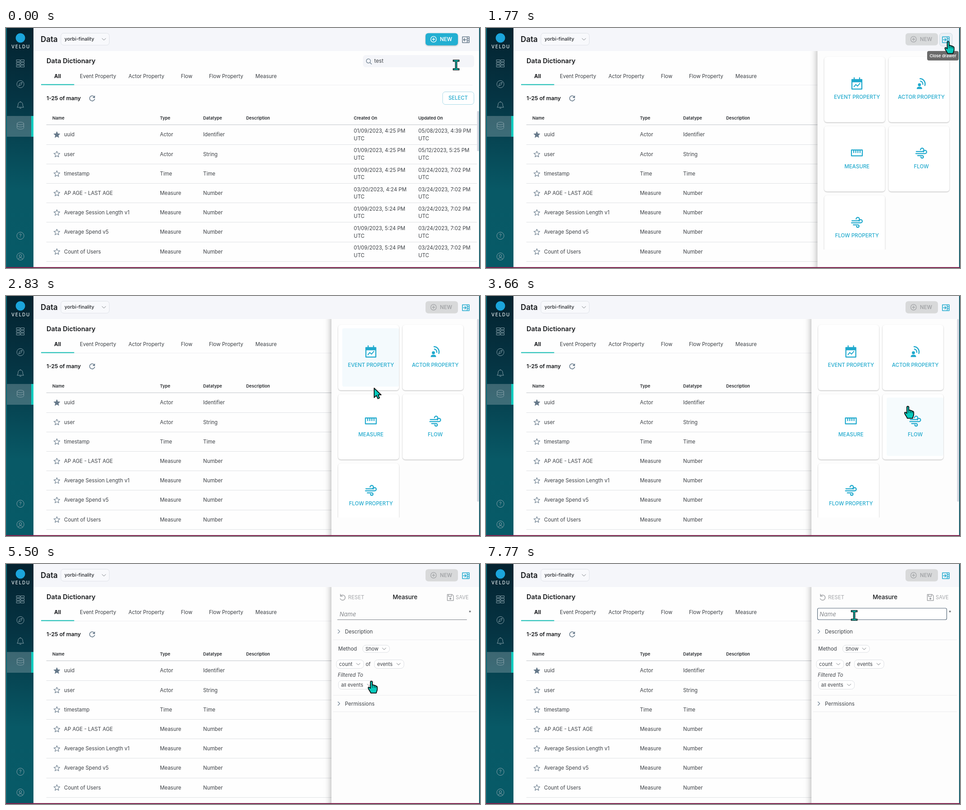
Write an HTML page that moves like this. It is 1053 px wide and 532 px high and loops after 8000 ms.

```html
<!DOCTYPE html>
<html lang="en">
<head>
<meta charset="utf-8">
<title>Data Dictionary</title>
<style>
html, body { margin: 0; width: 100%; height: 100%; overflow: hidden; background: #fff; }
svg { display: block; width: 1053px; height: 532px; font-family: Inter, "Open Sans", sans-serif; }
text { white-space: pre; }
.line { fill: none; stroke-linecap: round; stroke-linejoin: round; }
.card { fill: #fff; filter: drop-shadow(0 1px 1px rgba(0,0,0,.28)); }
.sheet { fill: #fdfdfd; filter: drop-shadow(0 0 8px rgba(0,0,0,.36)); }
.raised { filter: drop-shadow(0 1px 1.5px rgba(0,0,0,.3)); }
</style>
</head>
<body>
<svg id="stage" viewBox="0 0 1053 532" xmlns="http://www.w3.org/2000/svg"></svg>
<script>
const LOOP = 8000;
const BLUE = '#1fa9cd', INK = '#3d4146', DARK = '#17191c', SLATE = '#66798a', MUTED = '#a3a5a8';

// y is the vertical middle of the capitals
const text = (x, y, str, size = 11.48, fill = INK, weight = 400, more = '') =>
  `<text x="${x}" y="${(y + size * 0.36).toFixed(2)}" font-size="${size}" fill="${fill}" font-weight="${weight}" ${more}>${str}</text>`;
const rect = (x, y, w, h, fill, r = 0, more = '') =>
  `<rect x="${x}" y="${y}" width="${w}" height="${h}" rx="${r}" fill="${fill}" ${more}/>`;
const path = (d, stroke, width = 1, more = '') =>
  `<path class="line" d="${d}" stroke="${stroke}" stroke-width="${width}" ${more}/>`;
const at = (x, y, body, more = '') => `<g transform="translate(${x} ${y})" ${more}>${body}</g>`;
const rule = (x1, x2, y, color) => path(`M${x1} ${y}H${x2}`, color);
const chevron = (x, y, color = '#74787d') => path(`M${x - 4} ${y - 2}l4 4l4-4`, color);
const middle = 'text-anchor="middle"';

function star(x, y, fill) {
  let d = '';
  for (let i = 0; i < 10; i++) {
    const r = i % 2 ? 3.2 : 7, a = Math.PI * (i / 5 - 0.5);
    d += `${i ? 'L' : 'M'}${(x + r * Math.cos(a)).toFixed(1)} ${(y + 0.6 + r * Math.sin(a)).toFixed(1)}`;
  }
  return `<path d="${d}Z" fill="${fill}" stroke="${SLATE}" stroke-width="1.1" stroke-linejoin="round"/>`;
}

function sidebar() {
  const c = '#86a0a9';
  const ring = `<circle r="8" fill="none" stroke="${c}"/>`;
  return rect(0, 0, 61, 532, 'url(#deep)') + rect(0, 0, 2, 532, '#0c6674')
    + `<circle cx="32" cy="22" r="10.5" fill="#1ba5dc"/>`
    + text(12, 41.3, 'VELDU', 9.8, '#eef5f7', 500, 'letter-spacing="1.9"')
    + rect(2, 195, 59, 46, 'rgba(255,255,255,.22)') + rect(56, 195, 5, 46, '#0ccbbf')
    + at(32, 78.5, path('M-8.5-8h7.5v4h-7.5zM1-8h7.5v4H1zM-8.5-2h7.5v4h-7.5zM1-2h7.5v4H1zM-8.5 4h7.5v4h-7.5zM1 4h7.5v4H1z', c))
    + at(32, 124.5, ring + path('M4-4L1.5 1.5L-4 4L-1.5-1.5Z', c))
    + at(32, 170.5, path('M-7 5Q-5 3-5-1.5A5 5 0 0 1 5-1.5Q5 3 7 5ZM-1.5 7.5h3M0-7.5v1', c))
    + at(32, 216.5, path('M-7.5-5a7.5 2.8 0 1 1 15 0a7.5 2.8 0 1 1-15 0V5a7.5 2.8 0 0 0 15 0V-5M-7.5 0a7.5 2.8 0 0 0 15 0', c))
    + at(32, 460.5, ring + text(0, 0, '?', 10.5, c, 400, middle))
    + at(32, 506.5, ring + path('M-5 6Q-4 2.5 0 2.5T5 6M-2.8-1.5a2.8 2.8 0 1 1 5.6 0a2.8 2.8 0 1 1-5.6 0', c));
}

const newButton = (fill, ink, cls) => rect(932, 11.5, 72, 27, fill, 6, `class="${cls}"`)
  + path('M943.5 25a6.3 6.3 0 1 1 12.6 0a6.3 6.3 0 1 1-12.6 0M946.8 25h6M949.8 22v6', ink, 1.3)
  + text(964, 24.8, 'NEW', 11.4, ink, 600);

const drawerIcon = (color, arrow) => at(1021.5, 26,
  path('M-7.5-6.5h15v13h-15zM3-6.5v13M3-2.2h4.5M3 2.2h4.5', color, 1.5) + path(arrow, color, 1.6));

function header() {
  return rect(61, 0, 992, 51, '#f5f6fa')
    + text(77, 24.5, 'Data', 16.9, DARK, 600)
    + rect(122, 11.5, 107.5, 26.5, '#f8f9fc', 6, 'stroke="#dfe2e8"')
    + text(130, 24.3, 'yorbi-finality', 10.75, '#24272b', 500) + chevron(217.5, 25)
    + `<g id="newOn">${newButton('#22afd2', '#fff', 'raised')}</g>`
    + `<g id="newOff">${newButton('#d8d9da', MUTED, '')}</g>`
    + rect(1007.5, 11.5, 28.5, 28.5, '#e9f0f5', 6, 'id="iconHover" stroke="#cfdae1"')
    + `<g id="iconShut">${drawerIcon(SLATE, 'M1 0h-6M-2.5-2.8L-5 0l2.5 2.8')}</g>`
    + `<g id="iconOpen">${drawerIcon(BLUE, 'M-5.5 0h6M-2-2.8L.5 0L-2 2.8')}</g>`;
}

const U = '03/24/2023, 7:02 PM', C = '01/09/2023, 5:24 PM', E = '01/09/2023, 4:25 PM';
const rows = [
  ['uuid', 'Actor', 'Identifier', E, '05/08/2023, 4:39 PM'],
  ['user', 'Actor', 'String', E, '05/12/2023, 5:25 PM'],
  ['timestamp', 'Time', 'Time', E, U],
  ['AP AGE - LAST AGE', 'Measure', 'Number', '03/20/2023, 4:24 PM', U],
  ['Average Session Length v1', 'Measure', 'Number', C, U],
  ['Average Spend v5', 'Measure', 'Number', C, U],
  ['Count of Users', 'Measure', 'Number', C, U]
];

function page() {
  let s = text(90, 73, 'Data Dictionary', 14.6, DARK, 600)
    + rect(793, 60, 247, 27, '#f4f5f9', 6)
    + path('M800.5 73a4.6 4.6 0 1 1 9.2 0a4.6 4.6 0 1 1-9.2 0M808.5 76.5l3.5 3.5', SLATE, 1.2)
    + text(818, 73, 'test', 11.7)
    + rule(90, 1036, 126.5, '#ededf1') + rect(78, 124.5, 73.5, 2, '#14bdb3')
    + text(107, 106.5, 'All', 11.7, DARK, 700);
  [[164, 'Event Property'], [272, 'Actor Property'], [388.5, 'Flow'], [451, 'Flow Property'], [554, 'Measure']]
    .forEach(([x, label]) => s += text(x, 106.5, label, 11.5));
  s += text(90, 156, '1-25 of many', 12.2, DARK, 600)
    + path('M196 152.5a5.7 5.7 0 1 0 .9 5', SLATE, 1.6) + `<path d="M197.6 149.5v5.6h-5.6z" fill="${SLATE}"/>`
    + rect(970, 141.5, 69.5, 28, '#fff', 6, 'stroke="#a8d9e8"')
    + text(1004.5, 155.3, 'SELECT', 11.3, BLUE, 500, middle);
  [[103, 'Name'], [342, 'Type'], [438, 'Datatype'], [533.5, 'Description'], [772.5, 'Created On'], [916, 'Updated On']]
    .forEach(([x, label]) => s += text(x, 199.7, label, 9.5, '#24272b', 600));
  s += rule(90, 1046, 214.5, '#bfc3c8');
  rows.forEach((r, i) => {
    const y = 236.3 + 43.2 * i;
    s += star(113, y, i ? 'none' : SLATE)
      + text(129, y, r[0]) + text(342, y, r[1]) + text(438, y, r[2])
      + text(772.5, y - 8.2, r[3]) + text(772.5, y + 8.2, 'UTC')
      + text(916, y - 8.2, r[4]) + text(916, y + 8.2, 'UTC')
      + rule(90, 1046, Math.round(y + 21.2) + 0.5, '#dfe1e4');
  });
  return s + rect(1046.5, 184, 4.5, 89, '#d3d6e0', 2);
}

const wind = path('M-11-3H2a3.7 3.7 0 1 0-3.7-3.7M-12 1.5H8.5a3.5 3.5 0 1 0-3.5-3.5M-8 6H2a2.8 2.8 0 1 1-2.8 2.8', BLUE, 2.2);
const icons = {
  event: path('M-11-9h22V12h-22zM-6-13v4M6-13v4', BLUE, 2.3) + rect(-11, -9, 22, 6, BLUE)
    + path('M-6.5 7l4-5l4 3.5l5-6', BLUE, 1.9),
  actor: `<circle cx="-4" cy="2.5" r="3.4" fill="${BLUE}"/><path d="M-10 12q0-5 5-5h2q5 0 5 5z" fill="${BLUE}"/>`
    + path('M-2.5-11A11.5 11.5 0 0 1 8 4M-1.5-5.5A6.5 6.5 0 0 1 3.5 1.5', BLUE, 2.4),
  ruler: path('M-12-6.5h24v13h-24zM-7-6v5.5M-2.3-6v5.5M2.3-6v5.5M7-6v5.5', BLUE, 2.2),
  wind
};

// [id, x, y, icon, label], x measured from the drawer's left edge
const cards = [
  ['event', 15, 64, 'event', 'EVENT PROPERTY'],
  ['actor', 158, 64, 'actor', 'ACTOR PROPERTY'],
  ['measure', 15, 217.5, 'ruler', 'MEASURE'],
  ['flow', 158, 217.5, 'wind', 'FLOW'],
  ['flowProp', 15, 371, 'wind', 'FLOW PROPERTY']
];

const menu = () => cards.map(([id, x, y, icon, label]) =>
  rect(x, y, 135, 145, '#fff', 6, 'class="card"')
  + rect(x + 9, y + 7.5, 126, 129.5, '#f4fafd', 4, `id="hl-${id}" opacity="0"`)
  + at(x + 72.5, y + 59.3, icons[icon])
  + text(x + 72.7, y + 89.2, label, 11.5, BLUE, 500, middle)).join('');

const picker = (x, y, w, h, label) => rect(x, y, w, h, '#fff', 7, 'stroke="#dcdfe3"')
  + text(x + 6, y + h / 2, label, 11) + chevron(x + w - 12, y + h / 2);
const fold = (y, label) => path(`M737.5 ${y - 4}l4 4l-4 4`, SLATE, 1.1) + text(753, y, label, 11.45);

const form = () => path('M743.5 70.5a5.8 5.8 0 1 1-1 6.5M743 67v4.5h4.5', MUTED, 1.6)
  + text(760, 74, 'RESET', 11.5, MUTED)
  + text(886.5, 73, 'Measure', 13.2, DARK, 500, middle)
  + path('M980.5 67.5h10.5l3 3v10.5h-13.5zM983 67.5v4.5h6.5v-4.5', MUTED, 1.5)
  + `<circle cx="987.2" cy="76.7" r="2.2" fill="${MUTED}"/>` + text(999, 74, 'SAVE', 11.3, MUTED)
  + rect(736.5, 98, 287, 25.5, '#fff', 3, 'id="field" stroke="#56697a" stroke-width="1.2"')
  + `<g id="underline">${rule(736.5, 1023.5, 123.5, '#7b8087')}</g>`
  + text(741, 111, 'Name', 13, '#85888c', 400, 'font-style="italic"')
  + rect(740.5, 103, 1.2, 16, '#222', 0, 'id="caret"')
  + text(1028, 107.5, '*', 11)
  + fold(149.7, 'Description') + rule(727, 1046, 168, '#ececee')
  + text(738, 188, 'Method', 11.5) + picker(792.5, 180, 59.5, 16, 'Show')
  + picker(734, 212.5, 60.5, 19, 'count') + text(799, 222, 'of', 11.4) + picker(818.5, 212.5, 65.5, 19, 'events')
  + text(737, 246, 'Filtered To', 11.3, INK, 400, 'font-style="italic"')
  + picker(738.5, 258.5, 80, 19, 'all events')
  + rule(727, 1046, 291, '#ececee') + fold(309.5, 'Permissions') + rule(727, 1046, 327.5, '#ececee');

const drawer = () => `<g clip-path="url(#below)"><g id="drawer">${rect(0, 40, 345, 510, '#fdfdfd', 0, 'class="sheet"')}`
  + `<g id="menu"><g clip-path="url(#fold)">${menu()}</g>${rect(323.5, 51, 4, 405, '#d3d6e0', 2)}</g>`
  + `<g id="form">${at(-723, 0, form())}</g></g></g>`;

const TEAL = '#06cbbd';
const solid = d => `<path d="${d}" fill="${TEAL}" stroke="#0a0f10" stroke-width="1.8" stroke-linejoin="round"/>`;
const beam = 'M-5-9.5H5M0-9.5V9.5M-5 9.5H5';
const pointers = {
  beam: path(beam, '#0a0f10', 4.6, 'style="stroke-linecap:square"') + path(beam, TEAL, 1.8),
  arrow: solid('M0 0V21L5 16.5L8.3 23.5L12 21.8L9 15H15.5Z'),
  hand: solid('M-2.4 2.6C-2.4 0 2 0 2 2.6V9.5C3 8.6 6 8.8 6.2 10.6C7 9.6 9.6 10 9.8 12C11 11.2 12.8 12 12.8 14V19C12.8 22 11 23.5 10.5 27.2H-1.5C-2 24-7.2 19-7.4 15.5C-7.4 13-4.5 13.2-2.4 16.5Z')
    + path('M2 10v5M6.1 11v4M9.7 12.5v3', '#0a0f10', 1)
};

const stage = document.getElementById('stage');
stage.innerHTML = `<defs>
  <linearGradient id="deep" x2="0" y2="1"><stop offset="0" stop-color="#04222f"/><stop offset=".3" stop-color="#053544"/>
  <stop offset=".68" stop-color="#085966"/><stop offset="1" stop-color="#075a67"/></linearGradient>
  <clipPath id="below"><path d="M61 51H1051V530H61Z"/></clipPath>
  <clipPath id="fold"><path d="M0 51H330V491H0Z"/></clipPath></defs>`
  + rect(0, 0, 1053, 532, '#fefefe') + page() + header() + sidebar() + drawer()
  + `<g id="tip">${rect(980, 51, 70, 21, '#636363', 4)}<text id="tipText" x="1015" y="64.7" font-size="9.25" font-weight="600" fill="#fff" ${middle}></text></g>`
  + rect(1051, 0, 2, 532, '#0d5663') + rect(0, 530, 1053, 2, '#7c1f4b')
  + `<g id="cursor">${Object.keys(pointers).map(k => `<g id="${k}">${pointers[k]}</g>`).join('')}</g>`;

const el = {};
stage.querySelectorAll('[id]').forEach(n => el[n.id] = n);

// cursor stops: time, x, y
const stops = [
  [0, 1000, 82], [20, 1000, 82], [300, 1012, 58], [620, 1027, 29.5], [1960, 1027, 29.5],
  [2210, 1000, 60], [2500, 895, 145], [2830, 818, 204], [2970, 813, 224], [3070, 813, 224],
  [3320, 816, 285], [3600, 920, 262], [3860, 971, 181], [3960, 971, 181], [4350, 956, 156.5],
  [4830, 956, 156.5], [5050, 890, 208], [5330, 812, 259], [5640, 812, 259], [5900, 833, 214],
  [6180, 840, 191.5], [6270, 840, 191.5], [6430, 853, 196], [6470, 853, 196],
  [6750, 836, 150], [7080, 818, 114], [8000, 818, 114]
];
const shapes = [
  [0, 'beam'], [230, 'arrow'], [470, 'hand'], [2070, 'arrow'], [2290, 'hand'], [2810, 'arrow'],
  [3120, 'hand'], [3480, 'arrow'], [3540, 'hand'], [3740, 'arrow'], [3800, 'hand'], [5040, 'arrow'],
  [5130, 'hand'], [5710, 'arrow'], [5850, 'hand'], [6500, 'arrow'], [6970, 'beam']
];
const hovers = [
  ['actor', 2290, 2530], ['event', 2560, 2840], ['measure', 3120, 3460], ['flow', 3540, 3740],
  ['actor', 3800, 5020], ['measure', 5130, 5450]
];

const clamp = v => Math.max(0, Math.min(1, v));
const fade = (t, from, to, span) => clamp((t - from) / span) * clamp(1 - (t - to) / span);

// Hermite curve through the stops, at rest wherever a stop repeats
function cursorAt(t) {
  let i = 0;
  while (i < stops.length - 2 && stops[i + 1][0] <= t) i++;
  const a = stops[i], b = stops[i + 1], span = b[0] - a[0], u = (t - a[0]) / span;
  const same = (p, q) => p[1] === q[1] && p[2] === q[2];
  const slope = (k, c) => {
    const p = stops[k - 1], q = stops[k], r = stops[k + 1];
    return !p || !r || same(p, q) || same(q, r) ? 0 : (r[c] - p[c]) / (r[0] - p[0]) * span;
  };
  return [1, 2].map(c => {
    const d = b[c] - a[c], m = slope(i, c), n = slope(i + 1, c);
    return a[c] + u * (m + u * (3 * d - 2 * m - n + u * (m + n - 2 * d)));
  });
}

const show = (id, on) => el[id].style.display = on ? '' : 'none';
const alpha = (id, v) => el[id].style.opacity = v;

function render(t) {
  const open = t >= 1405;
  const slide = 1 - (1 - clamp((t - 1410) / 490)) ** 2.4;
  el.drawer.setAttribute('transform', `translate(${(1053 - 330 * slide).toFixed(2)} 0)`);
  show('drawer', open);
  show('menu', t < 5450);
  show('form', t >= 5450);

  const off = 1 - (1 - clamp((t - 1430) / 430)) ** 2;
  alpha('newOn', 1 - off);
  alpha('newOff', off);
  show('iconShut', !open);
  show('iconOpen', open);
  alpha('iconHover', fade(t, 470, 2060, 130));
  alpha('tip', fade(t, 620, 2220, 160) * 0.95);
  el.tipText.textContent = open ? 'Close drawer' : 'Open drawer';

  const glow = {};
  hovers.forEach(([id, from, to]) => glow[id] = Math.max(glow[id] || 0, fade(t, from, to, 150)));
  for (const id in glow) alpha('hl-' + id, glow[id]);

  show('field', t >= 7150);
  show('underline', t < 7315);
  show('caret', t >= 7200 && t < 7770);

  const [x, y] = cursorAt(t);
  el.cursor.setAttribute('transform', `translate(${x.toFixed(2)} ${y.toFixed(2)})`);
  const shape = shapes.filter(s => s[0] <= t).pop()[1];
  for (const k in pointers) show(k, k === shape);
}

const start = performance.now();
function tick() {
  render((performance.now() - start) % LOOP);
  requestAnimationFrame(tick);
}
tick();
</script>
</body>
</html>
```
